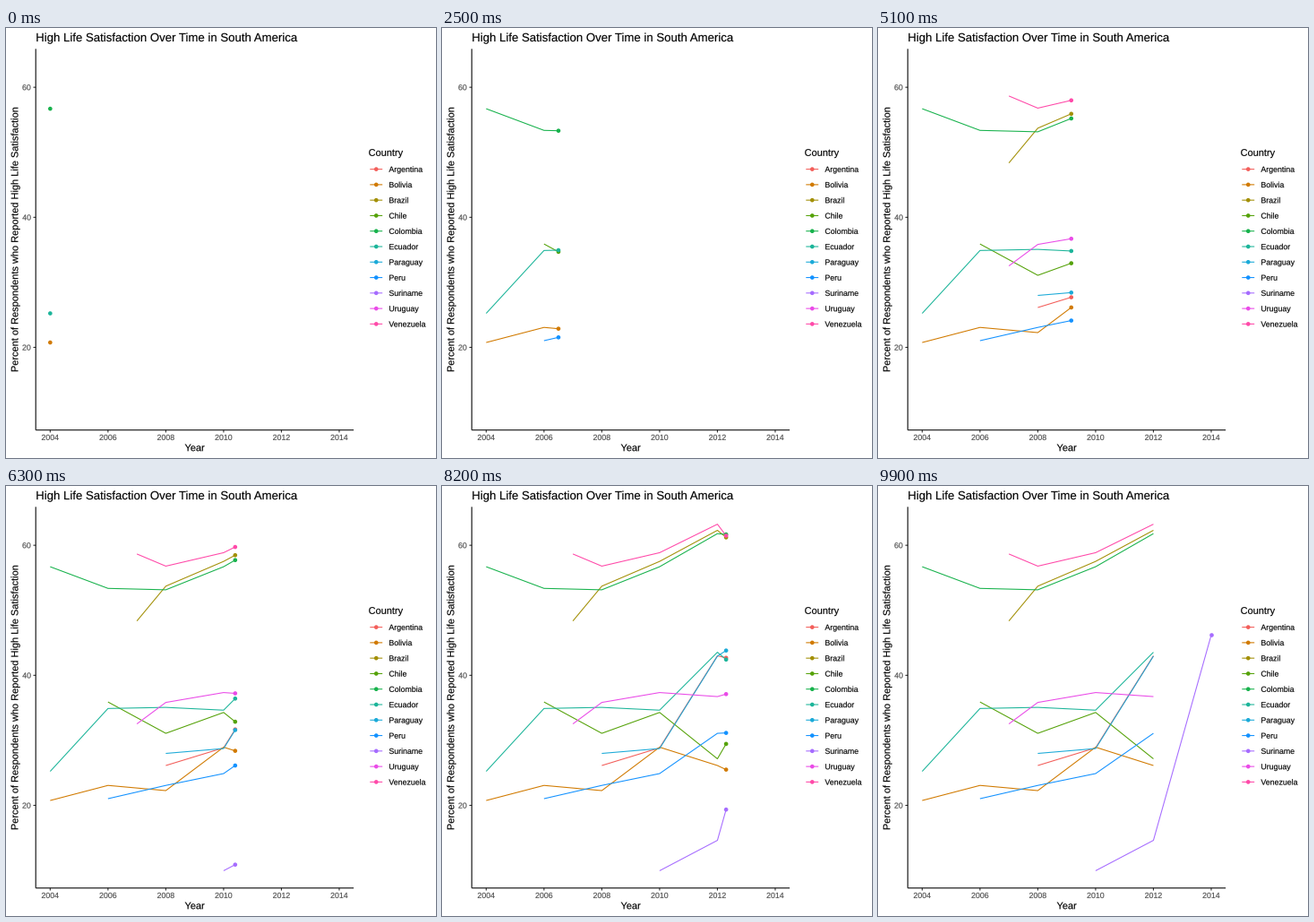
Animation of 480x480 px, one loop 10 s. Source, as a matplotlib script:

```python
import numpy as np
import matplotlib as mpl
import matplotlib.pyplot as plt
from matplotlib.animation import FuncAnimation
from matplotlib.patches import PathPatch
from matplotlib.textpath import TextPath
from matplotlib.transforms import Affine2D

mpl.rcParams["font.family"] = ["Liberation Sans"]

SIZE, DPI = 480, 72
FRAMES, INTERVAL = 100, 100
FIRST, LAST = 2004, 2014
LEFT, RIGHT, TOP, BOTTOM = 33.2, 388.1, 23.3, 448.8
LOW, HIGH = 9.95, 63.24
PAD = 0.05 * (HIGH - LOW)
LINE_W, DOT_AREA, TICK = 1.07, 4.62 ** 2, 2.75
GREY = "#4d4d4d"

# name: (colour, first year, values there and at each later even year)
SERIES = {
    "Argentina": ("#f35e5a", 2008, [26.13, 28.85, 43.0, 40.93]),
    "Bolivia": ("#d17a00", 2004, [20.75, 23.07, 22.27, 28.95, 26.13, 21.93]),
    "Brazil": ("#a39007", 2007, [48.36, 53.71, 57.52, 62.3, 55.04]),
    "Chile": ("#55a209", 2006, [35.9, 31.08, 34.29, 27.16, 42.44]),
    "Colombia": ("#17b24c", 2004, [56.7, 53.37, 53.15, 56.7, 61.79, 60.97]),
    "Ecuador": ("#1cb59a", 2004, [25.23, 34.9, 35.07, 34.64, 43.55, 36.04]),
    "Paraguay": ("#1baad8", 2008, [27.99, 28.74, 42.95, 48.7]),
    "Peru": ("#1392ff", 2006, [21.03, 23.07, 24.89, 31.08, 31.5]),
    "Suriname": ("#a66cff", 2010, [9.95, 14.62, 46.18]),
    "Uruguay": ("#ea4be8", 2007, [32.53, 35.83, 37.35, 36.73, 39.28]),
    "Venezuela": ("#ff49a9", 2007, [58.66, 56.79, 58.86, 63.24, 51.46]),
}

fig = plt.figure(figsize=(SIZE / DPI, SIZE / DPI), dpi=DPI, facecolor="white")

# pixel coordinates, origin at the top left
stage = fig.add_axes([0, 0, 1, 1])
stage.set(xlim=(0, SIZE), ylim=(SIZE, 0))
stage.axis("off")


def to_px(year, value):
    x = LEFT + (year - FIRST + 0.5) / (LAST - FIRST + 1) * (RIGHT - LEFT)
    y = BOTTOM - (value - LOW + PAD) / (HIGH - LOW + 2 * PAD) * (BOTTOM - TOP)
    return x, y


def stroke(xs, ys, color, **kw):
    line, = stage.plot(xs, ys, color=color, lw=LINE_W, snap=False,
                       solid_capstyle="butt", solid_joinstyle="round", **kw)
    return line


def label(x, y, text, size, color="black", align=0, angle=0):
    """Outlined text on a baseline; align is 0 left, 0.5 centre, 1 right."""
    path = TextPath((0, 0), text, size=size)
    shift = align * (path.get_extents().x0 + path.get_extents().x1)
    place = Affine2D().translate(-shift, 0).rotate_deg(angle)
    place = place.scale(1, -1).translate(x, y)
    stage.add_patch(PathPatch(path, facecolor=color, edgecolor=color, lw=0.15,
                              transform=place + stage.transData))


# titles
label(LEFT, 15, "High Life Satisfaction Over Time in South America", 13.2)
label((LEFT + RIGHT) / 2, 472.2, "Year", 11, align=0.5)
label(13.4, (TOP + BOTTOM) / 2,
      "Percent of Respondents who Reported High Life Satisfaction",
      11, align=0.5, angle=90)

# axes
for year in range(FIRST, LAST + 1, 2):
    x, _ = to_px(year, LOW)
    stroke([x, x], [BOTTOM, BOTTOM + TICK], "#333333")
    label(x, BOTTOM + 11.2, str(year), 8.8, GREY, align=0.5)
for value in (20, 40, 60):
    _, y = to_px(FIRST, value)
    stroke([LEFT - TICK, LEFT], [y, y], "#333333")
    label(LEFT - 5.3, y + 3.15, str(value), 8.8, GREY, align=1)
stroke([LEFT, LEFT], [TOP, BOTTOM], "black", zorder=4)
stroke([LEFT, RIGHT], [BOTTOM, BOTTOM], "black", zorder=4)

# legend
label(404.6, 142.8, "Country", 11)
key_y = 157.6 + 17.28 * np.arange(len(SERIES))
for y, (name, (color, *_)) in zip(key_y, SERIES.items()):
    stroke([406.3, 420.2], [y, y], color)
    label(427.4, y + 3.15, name, 8.8)
stage.scatter(np.full(len(SERIES), 413.25), key_y, s=DOT_AREA, linewidths=0,
              c=[s[0] for s in SERIES.values()], zorder=3)

tracks = []
for name, (color, start, values) in SERIES.items():
    years = np.array([start] + [y for y in range(FIRST, LAST + 1, 2) if y > start])
    keys = np.round((years - FIRST) * (FRAMES - 1) / (LAST - FIRST))
    xs, ys = to_px(years, np.array(values))
    tracks.append((name, color, stroke([], [], color), keys, xs, ys))
dots = stage.scatter([], [], s=DOT_AREA, linewidths=0, zorder=3)
stage.set(xlim=(0, SIZE), ylim=(SIZE, 0))


def update(i):
    spots, colors = [], []
    for name, color, line, keys, xs, ys in tracks:
        # on the last frame every series but one falls back to 2012
        dropped = i == FRAMES - 1 and name != "Suriname"
        done = keys < i if dropped else keys <= i
        px, py = xs[done], ys[done]
        if len(px) and not dropped:
            head = np.interp(i, keys, xs), np.interp(i, keys, ys)
            px, py = np.append(px, head[0]), np.append(py, head[1])
            spots.append(head)
            colors.append(color)
        line.set_data(px, py)
    dots.set_offsets(spots)
    dots.set_facecolor(colors)
    return [dots] + [t[2] for t in tracks]


anim = FuncAnimation(fig, update, frames=FRAMES, interval=INTERVAL,
                     repeat=True, repeat_delay=0, blit=False)
plt.show()
```
